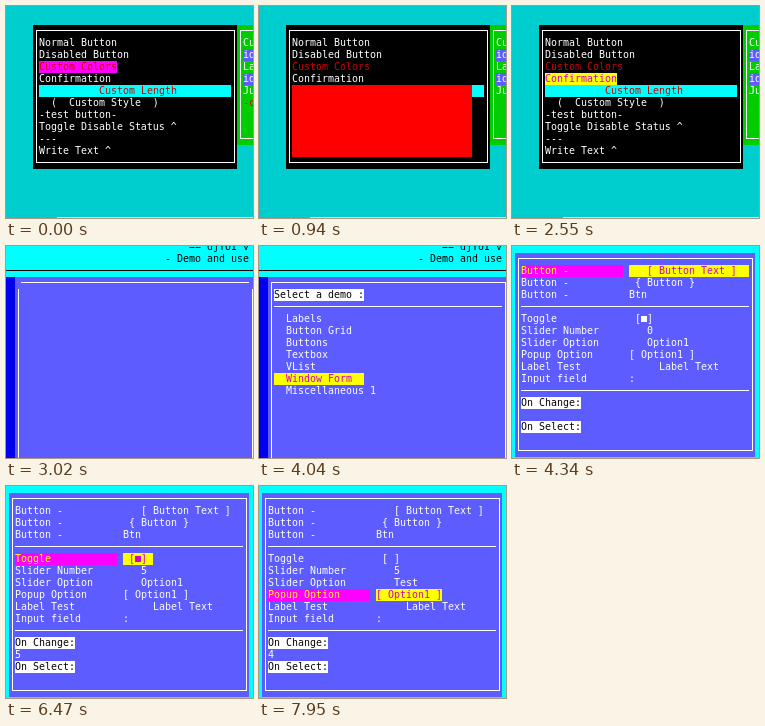
These frames come from a looping animation (247x212 px, 8 s). An HTML page:

```html
<!DOCTYPE html>
<html lang="en">
<head>
<meta charset="utf-8">
<title>Terminal menu demo</title>
<style>
html, body { margin: 0; width: 100%; height: 100%; overflow: hidden; background: #00cdcd; }
svg { display: block; width: 247px; height: 212px; shape-rendering: crispEdges; }
text { font: 9.967px "DejaVu Sans Mono", monospace; white-space: pre; }
</style>
</head>
<body>
<svg id="screen" viewBox="0 0 247 212"></svg>
<script>
const LOOP = 8000, CELL = 6, ROW = 12;
const C = {
  teal: '#00cdcd', cyan: '#00ffff', blue: '#0000ee', light: '#5c5cff', green: '#00cd00',
  red: '#ff0000', darkRed: '#cd0000', pink: '#ff00ff', purple: '#cd00cd',
  yellow: '#ffff00', white: '#ffffff', black: '#000000'
};

const rect = (x, y, w, h, fill) => `<rect x="${x}" y="${y}" width="${w}" height="${h}" fill="${fill}"/>`;
const text = (x, y, s, fill = C.white) => {
  const safe = String(s).replace(/&/g, '&amp;').replace(/</g, '&lt;');
  return `<text x="${x}" y="${y + 9}" fill="${fill}">${safe}</text>`;
};
const bar = (x, y, cells, fill) => rect(x, y, cells * CELL, ROW, fill);
const tag = (x, y, s, bg, fg) => bar(x, y, s.length, bg) + text(x, y, s, fg);
const pick = (x, y, s, on, bg = C.yellow, fg = C.purple) => on ? tag(x, y, s, bg, fg) : text(x, y, s);
const rule = (x, y, w, fill = C.white) => rect(x, y + 5, w, 1, fill);

// Outline runs through the middle of the outer cells
function frame(x, y, w, h) {
  const l = x + 3, t = y + 5, r = x + w - 3, b = y + h - 7;
  return rect(l, t, r - l + 1, 1, C.white) + rect(l, b, r - l + 1, 1, C.white) +
    rect(l, t, 1, b - t, C.white) + rect(r, t, 1, b - t, C.white);
}
const panel = (x, y, w, h, fill) => rect(x, y, w, h, fill) + frame(x, y, w, h);

// Page 1: buttons, with an optional confirmation box
function buttons({ focus, sample, box = 0, yes }) {
  let s = rect(0, 0, 247, 212, C.teal) + rect(51, 211, 196, 1, '#e5e5e5');
  s += panel(231, 19, 120, 120, C.green);
  ['Cu', 'id', 'La', 'id', 'Ju'].forEach((label, i) => {
    const y = 31 + i * ROW;
    if (label === 'id') s += bar(237, y, 2, C.light);
    s += text(237, y, label);
  });
  if (sample) s += text(237, 91, '-c', C.darkRed);

  s += panel(27, 19, 204, 144, C.black);
  s += text(33, 31, 'Normal Button') + text(33, 43, 'Disabled Button');
  if (focus === 'colors') s += bar(33, 55, 13, C.pink);
  s += text(33, 55, 'Custom Colors', C.darkRed);
  s += pick(33, 67, 'Confirmation', focus === 'confirm');
  s += bar(33, 79, 32, C.cyan) + text(93, 79, 'Custom Length', C.darkRed);
  ['  (  Custom Style  )', '-test button-', 'Toggle Disable Status ^', '---', 'Write Text ^']
    .forEach((label, i) => s += text(33, 91 + i * ROW, label));

  if (box > 0) s += rect(33, 79, 180, 72, C.red);
  if (box > 1) s += frame(33, 79, 180, 72) + text(45, 103, 'Are you sure?');
  if (box > 2) s += pick(63, 127, ' { YES } ', yes) + pick(135, 127, ' { NO } ', !yes);
  return s;
}

// Page 2: list of demos
const demos = ['Labels', 'Button Grid', 'Buttons', 'Textbox', 'VList', 'Window Form', 'Miscellaneous 1'];

function menu({ stage = 4, focus }) {
  let s = rect(0, 0, 247, 212, C.blue);
  if (stage > 0) s += rect(0, 0, 247, 31, C.cyan) + rule(0, 19, 247, C.black);
  if (stage > 1) s += text(183, -5, '== djTUI v', C.black) + text(159, 7, '- Demo and use', C.black);
  if (stage > 2) {
    const top = stage > 3 ? 36 : 43;
    s += rect(9, 31, 238, 181, C.light) + rule(15, 31, 228);
    s += rect(12, top, 1, 212 - top, C.white) + rect(246, top, 1, 212 - top, C.white);
  }
  if (stage > 3) {
    s += rect(12, 36, 235, 1, C.white) + rule(15, 55, 228);
    s += tag(15, 43, 'Select a demo :', C.white, C.black);
    demos.forEach((d, i) => s += pick(15, 67 + i * ROW, `  ${d}  `, i === focus));
  }
  return s;
}

// Page 3: form
const options = ['Option1', 'Option2', 'Option3', 'Option4', 'Test'];
const labels = ['Button -', 'Button -', 'Button -', , 'Toggle', 'Slider Number',
  'Slider Option', 'Popup Option', 'Label Test', 'Input field'];

function slider(value, on, first, last) {
  return on ? ` ${first ? ' ' : '◄'} ${value} ${last ? ' ' : '►'} ` : `   ${value}   `;
}

function form({ focus = 0, number = 0, option = 0, checked = true, change = '', empty }) {
  let s = rect(0, 0, 247, 212, C.cyan) + panel(3, 7, 240, 204, C.light);
  if (empty) return s;
  const values = ['   [ Button Text ]  ', ' { Button } ', 'Btn', , ' [ ] ',
    slider(number, focus === 5, number === 0),
    slider(options[option], focus === 6, option === 0, option === 4),
    '[ Option1 ]', '     Label Text', ':'];
  labels.forEach((label, i) => {
    const y = 19 + i * ROW, on = i === focus;
    if (on) s += bar(9, y, 17, C.pink);
    s += text(9, y, label, on ? C.yellow : C.white) + pick(117, y, values[i], on);
  });
  if (checked) s += rect(129, 70, 6, 6, focus === 4 ? C.purple : C.white);
  s += rule(9, 55, 228) + rule(9, 139, 228);
  s += tag(9, 151, 'On Change:', C.white, C.black) + text(9, 163, change);
  s += tag(9, 175, 'On Select:', C.white, C.black);
  return s;
}

// Each step: start time, page, changes to that page's state
const steps = [
  [0, buttons, { focus: 'colors', sample: true }],
  [310, buttons, { focus: '', sample: false }],
  [460, buttons, { focus: 'confirm' }],
  [860, buttons, { focus: '' }],
  [930, buttons, { box: 1 }],
  [1010, buttons, { box: 2 }],
  [1090, buttons, { box: 3, yes: false }],
  [1700, buttons, { yes: true }],
  [2010, buttons, { box: 0 }],
  [2090, buttons, { focus: 'confirm' }],
  [2640, menu, { stage: 0 }],
  [2720, menu, { stage: 1 }],
  [2860, menu, { stage: 2 }],
  [3020, menu, { stage: 3 }],
  [3090, menu, { stage: 4, focus: 2 }],
  [3410, menu, { focus: 3 }],
  [3640, menu, { focus: 4 }],
  [4040, menu, { focus: 5 }],
  [4270, form, { empty: true }],
  [4340, form, { empty: false }],
  [4660, form, { focus: 1 }],
  [4820, form, { focus: 2 }],
  [5000, form, { focus: 4 }],
  [5220, form, { focus: 5 }],
  ...[5680, 5830, 5980, 6130, 6280].map((t, i) => [t, form, { number: i + 1, change: i + 1 }]),
  [6470, form, { focus: 4 }],
  [6700, form, { checked: false, change: 'false' }],
  [6850, form, { focus: 5 }],
  [7000, form, { focus: 6 }],
  ...[7190, 7340, 7490, 7640].map((t, i) => [t, form, { option: i + 1, change: i + 1 }]),
  [7950, form, { focus: 7 }]
];

const state = new Map();
const scenes = steps.map(([time, page, patch]) => {
  const next = { ...state.get(page), ...patch };
  state.set(page, next);
  return { time, svg: page(next) };
});

const screen = document.getElementById('screen');
let shown;
function draw() {
  const t = performance.now() % LOOP;
  const scene = scenes.findLast(s => s.time <= t);
  if (scene !== shown) screen.innerHTML = (shown = scene).svg;
  requestAnimationFrame(draw);
}
draw();
</script>
</body>
</html>
```
